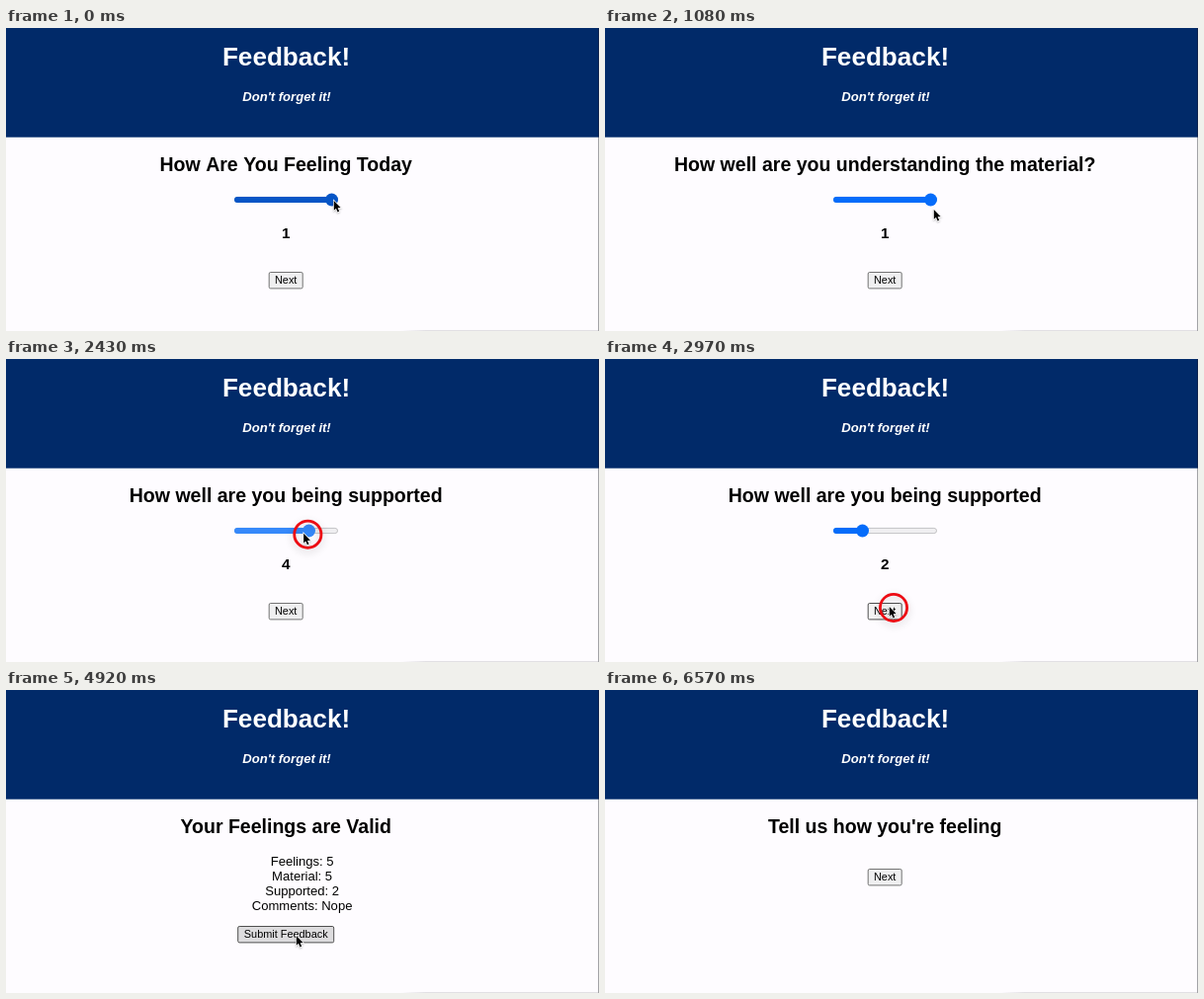
Animation, 600 px wide and 307 px high, one loop 6600 ms. Source, as an HTML page with a canvas:

```html
<!DOCTYPE html>
<html lang="en">
<head>
<meta charset="utf-8">
<title>Feedback</title>
<style>
html, body { margin: 0; width: 100%; height: 100%; overflow: hidden; background: #fefcff; }
canvas { display: block; width: 600px; height: 307px; }
</style>
</head>
<body>
<canvas id="stage"></canvas>
<script>
const W = 600, H = 307, LOOP = 6600, STEP = 30, MID = 283.2, CLICK = 90;
const TRACK = { x: 231, y: 174, w: 105, first: 237.5, gap: 23 };
const FONT = '"Liberation Sans", Arial, sans-serif';

const canvas = document.getElementById('stage');
const ctx = canvas.getContext('2d');
const ratio = window.devicePixelRatio || 1;
canvas.width = W * ratio;
canvas.height = H * ratio;

const spot = (x, y) => ({ x, y });
const next = spot(287, 250), nextHigh = spot(284, 191), submit = spot(293, 248);
const grip = spot(331, 174), field = spot(276, 175), exit = spot(300, 320);

// Screens run back to back; k is the progress through one, 0 to 1
const screens = [
  rating('How Are You Feeling Today', -240, 900, spot(345, 174)),
  rating('How well are you understanding the material?', 900, 2040, spot(407, 168)),
  rating('How well are you being supported', 2040, 3000, spot(258, 178)),
  {
    title: 'Any comments you would like to leave', start: 3000, end: 4080, clicks: true,
    stops: [[0, next], [.2, field], [.8, nextHigh]],
    press: [.22, .3], hide: [.36, .81],
    body(k, p, held) {
      comments(k);
      button('Next', 183.2, 35, p, held);
    }
  },
  {
    title: 'Your Feelings are Valid', start: 4080, end: 5220, clicks: true,
    stops: [[0, nextHigh], [.4, submit]],
    body(k, p, held) {
      ['Feelings: 5', 'Material: 5', 'Supported: 2', 'Comments: Nope'].forEach((line, i) =>
        text(line, 299.6, 178.2 + i * 15, 13.07));
      button('Submit Feedback', 239, 98, p, held);
    }
  },
  { title: '', start: 5220, end: 5760, stops: [[0, submit], [.8, nextHigh]], body() {} },
  {
    title: "Tell us how you're feeling", start: 5760, end: LOOP,
    stops: [[0, nextHigh], [.15, nextHigh], [.72, exit]],
    body(k, p, held) { button('Next', 181, 35, p, held); }
  }
];

function rating(title, start, end, drop) {
  const stops = [
    [0, next], [.155, spot(332, 183)], [.21, grip], [.25, grip],
    [.6, drop], [.84, drop], [.95, next]
  ];
  const press = [.25, .82];
  return {
    title, start, end, stops, press, clicks: true,
    body(k, p, held) {
      const pressed = k >= press[0];
      const from = pressed ? glide(stops, Math.min(k, press[1])).x : W;
      const steps = Math.round((from - TRACK.first) / TRACK.gap);
      const value = Math.max(1, Math.min(5, steps + 1));
      slider(value, p, within(k, press));
      text(pressed ? value : 1, MID, 213.2, 15.3, 'bold');
      button('Next', 247, 35, p, held);
    }
  };
}

const within = (k, range) => Boolean(range) && k >= range[0] && k < range[1];

// Eased position between timed stops
function glide(stops, k) {
  const i = stops.findIndex(stop => stop[0] > k);
  if (i < 0) return stops[stops.length - 1][1];
  const [k0, a] = stops[i - 1], [k1, b] = stops[i];
  const f = (k - k0) / (k1 - k0), e = f * f * (3 - 2 * f);
  return spot(a.x + (b.x - a.x) * e, a.y + (b.y - a.y) * e);
}

function text(str, x, y, size, style = '', color = '#000', align = 'center') {
  ctx.font = `${style} ${size}px ${FONT}`;
  ctx.fillStyle = color;
  ctx.textAlign = align;
  ctx.fillText(str, x, y);
}

function box(x, y, w, h, r, fill, stroke, line = 1) {
  ctx.beginPath();
  ctx.roundRect(x, y, w, h, r);
  ctx.fillStyle = fill;
  ctx.fill();
  if (stroke) {
    ctx.strokeStyle = stroke;
    ctx.lineWidth = line;
    ctx.stroke();
  }
}

function over(p, x, y, w, h) {
  return p && p.x >= x && p.x <= x + w && p.y >= y && p.y <= y + h;
}

function button(label, y, w, p, held) {
  const x = MID - w / 2;
  const hover = over(p, x, y, w, 17);
  const fill = hover ? (held ? '#f4f4f4' : '#dddcde') : '#efeff0';
  box(x + .5, y + .5, w - 1, 16.4, 1.5, fill, hover ? '#4f4f4f' : '#737373');
  text(label, MID, y + 12.4, 10.9);
}

function slider(value, p, dragging) {
  const { x, y, w, first, gap } = TRACK;
  const thumb = first + (value - 1) * gap;
  const hover = over(p, x, y - 7, w, 14);
  const color = dragging ? '#3689fa' : hover ? '#0755c6' : '#056cfa';
  box(x + .5, y - 2.6, w - 1, 5.2, 2.6, '#f0eff1', '#b7b6b9', .8);
  box(x, y - 3, thumb - x, 6, 3, color);
  ctx.beginPath();
  ctx.arc(thumb, y, 6.5, 0, Math.PI * 2);
  ctx.fill();
}

function comments(k) {
  const focused = k > .25;
  const typed = 'Nope'.slice(0, Math.max(0, Math.floor((k - .39) * 12)));
  if (focused) box(224.2, 166.5, 118.4, 15.8, 2, '#fff', '#1558c4', 2);
  else box(225.5, 167.5, 116, 14, 0, '#fff', '#858585');
  text(typed, 226.7, 178.2, 10.9, '', '#000', 'left');
}

function shadow(alpha, blur, drop) {
  ctx.shadowColor = `rgba(0,0,0,${alpha})`;
  ctx.shadowBlur = blur * ratio;
  ctx.shadowOffsetY = drop * ratio;
}

function ring(p) {
  ctx.save();
  shadow(.2, 9, 3);
  ctx.beginPath();
  ctx.arc(p.x + 5, p.y + 2, 13.6, 0, Math.PI * 2);
  ctx.strokeStyle = '#ed0b13';
  ctx.lineWidth = 2.8;
  ctx.stroke();
  ctx.restore();
}

function arrow(p) {
  ctx.save();
  ctx.translate(p.x + .8, p.y + 1);
  ctx.scale(.83, .83);
  shadow(.25, 2, 1);
  const shape = new Path2D('M0 0V11.8L2.6 9.4L4.5 14L6.5 13.1L4.6 8.7L8.2 8.5Z');
  ctx.strokeStyle = '#fff';
  ctx.lineWidth = 1.6;
  ctx.stroke(shape);
  ctx.shadowColor = 'transparent';
  ctx.fillStyle = '#000';
  ctx.fill(shape);
  ctx.restore();
}

function page() {
  const top = 110.7;
  ctx.fillStyle = '#fefcff';
  ctx.fillRect(0, 0, W, H);
  ctx.fillStyle = '#012a69';
  ctx.fillRect(0, 0, W, top);
  text('Feedback!', MID + .3, 38.3, 26.13, 'bold', '#fff');
  text("Don't forget it!", MID + .8, 74.3, 13.07, 'italic bold', '#fff');
  ctx.fillStyle = '#0a1f4c';
  ctx.fillRect(599, 0, 1, top);
  ctx.fillStyle = '#8d8c91';
  ctx.fillRect(599.2, top, .8, H);
  const fade = ctx.createLinearGradient(400, 0, 425, 0);
  fade.addColorStop(0, 'rgba(226,224,228,0)');
  fade.addColorStop(1, 'rgba(226,224,228,1)');
  ctx.fillStyle = fade;
  ctx.fillRect(400, 306, 199, 1);
}

function draw(t) {
  ctx.setTransform(ratio, 0, 0, ratio, 0, 0);
  page();
  const s = screens.find(item => t < item.end);
  const k = (t - s.start) / (s.end - s.start);
  const p = within(k, s.hide) ? null : glide(s.stops, k);
  const held = within(k, s.press) || (s.clicks && t >= s.end - CLICK);
  text(s.title, MID, 145, 19.55, 'bold');
  s.body(k, p, held);
  if (p && held) ring(p);
  if (p) arrow(p);
}

const begin = performance.now();
function tick() {
  const t = (performance.now() - begin) % LOOP;
  draw(Math.floor(t / STEP) * STEP);
  requestAnimationFrame(tick);
}
tick();
</script>
</body>
</html>
```
